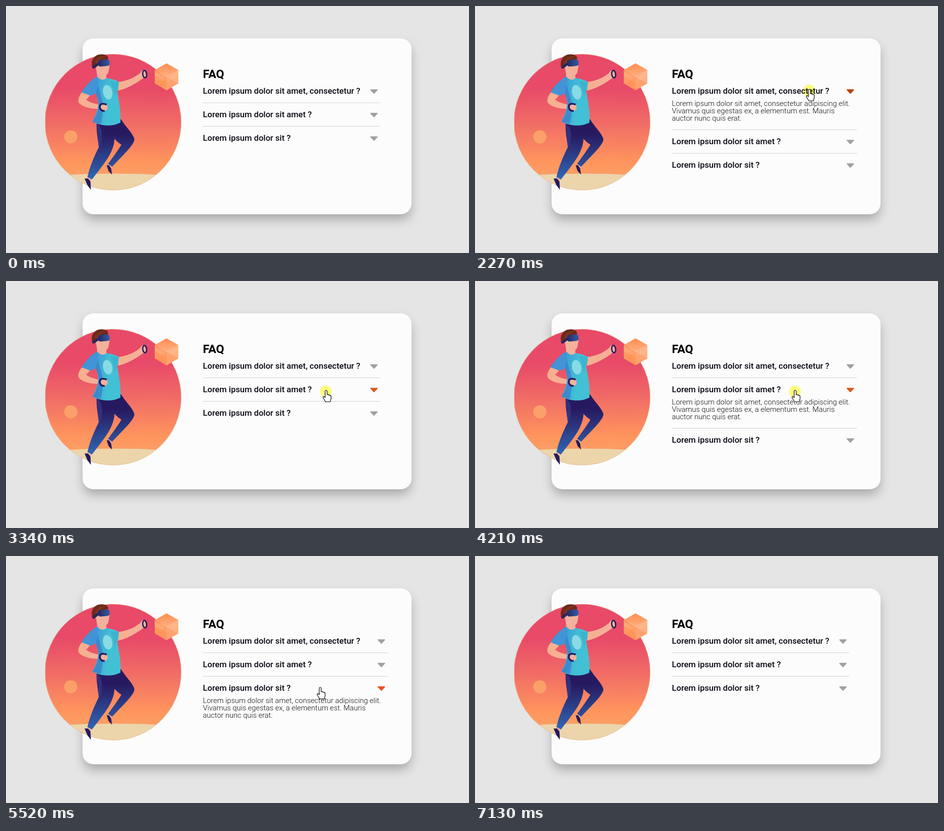
An HTML page for the animation above (7.73 s loop, 943x504 px).

```html
<!DOCTYPE html>
<html lang="en">
<head>
<meta charset="utf-8">
<title>FAQ accordion</title>
<style>
  html, body { margin: 0; width: 100%; height: 100%; overflow: hidden; background: #e5e5e5; }
  .card { position: absolute; left: 156px; top: 66px; width: 670px; height: 359px; border-radius: 22px;
    background: #fcfcfc; box-shadow: 0 12px 22px -2px rgba(0, 0, 0, .28); }
  svg { position: absolute; left: 0; top: 0; width: 943px; height: 504px; }
  text { font-family: Roboto, sans-serif; fill: #000; }
  .title { font-size: 24px; font-weight: 700; }
  .question { font-size: 17px; font-weight: 500; fill: #0b0712; }
  .answer { font-size: 15px; font-weight: 300; fill: #111; }
  .click { fill: #ffff7d; mix-blend-mode: multiply; }
  .pointer { fill: #fff; stroke: #000; stroke-linejoin: round; }
</style>
</head>
<body>
<div class="card"></div>
<svg viewBox="0 0 943 504">
  <defs>
    <linearGradient id="sky" x1="0" y1="0" x2="0" y2="1">
      <stop offset=".25" stop-color="#e84a68"/>
      <stop offset=".5" stop-color="#f06b66"/>
      <stop offset=".79" stop-color="#ff955d"/>
      <stop offset="1" stop-color="#f8a86f"/>
    </linearGradient>
    <linearGradient id="shirt" x1="0" y1="0" x2="1" y2=".15">
      <stop offset=".1" stop-color="#3c86d3"/>
      <stop offset=".45" stop-color="#3ea3d5"/>
      <stop offset=".75" stop-color="#42c0d5"/>
    </linearGradient>
    <linearGradient id="pants" gradientUnits="userSpaceOnUse" x1="0" y1="245" x2="0" y2="350">
      <stop offset=".15" stop-color="#27195f"/>
      <stop offset="1" stop-color="#3163b0"/>
    </linearGradient>
    <linearGradient id="skin" x1="0" y1="0" x2="1" y2="0">
      <stop offset="0" stop-color="#f8b08c"/>
      <stop offset="1" stop-color="#f3b09c"/>
    </linearGradient>
    <linearGradient id="visor" x1="0" y1="0" x2="1" y2="0">
      <stop offset="0" stop-color="#28275f"/>
      <stop offset="1" stop-color="#315ba6"/>
    </linearGradient>
    <linearGradient id="lid" x1="0" y1="0" x2="0" y2="1">
      <stop offset="0" stop-color="#ff8d50"/>
      <stop offset="1" stop-color="#ffb183"/>
    </linearGradient>
    <clipPath id="scene"><path d="M80 90H365V385H80z"/></clipPath>
    <clipPath id="disc"><circle cx="218" cy="237" r="139"/></clipPath>
  </defs>

  <g clip-path="url(#scene)">
    <circle cx="218" cy="237" r="139" fill="url(#sky)"/>
    <path d="M70 350Q130 342 218 342T366 350V385H70z" fill="#ecd5ab" clip-path="url(#disc)"/>
    <circle cx="218" cy="237" r="138.6" fill="none" stroke="#e6bd96" stroke-opacity=".7"/>
    <circle cx="132" cy="267" r="13.5" fill="#faa068"/>
  </g>

  <g id="cube">
    <path d="M327 117L351 130.500L327 145L303 130.500z" fill="url(#lid)"/>
    <path d="M303 130.500L327 145V172L303 158z" fill="#ff9a60"/>
    <path d="M351 130.500L327 145V172L351 158z" fill="#fdb184"/>
    <path d="M303 134L327 148L351 134V143L327 156L303 143z" fill="#ffc198" opacity=".35"/>
    <path d="M327 145L351 158L327 172L303 158z" fill="#ff8c52" opacity=".4"/>
  </g>

  <g id="player">
    <path d="M166 344L176 350L172 358L165 354zM211 316L217 325L215 331L208 326z" fill="#f5b399"/>
    <path d="M160 352L167 352L172 358L173 375L166 366zM205 325L210 325L214 331L216 344L209 337z" fill="#241a60"/>
    <path d="M205 240L234 231C245 248 260 262 261.500 272C261 284 236 306 216 328L208 322C218 308 230 292 235 283C224 276 212 264 205 240z" fill="url(#pants)"/>
    <path d="M185 234C183 255 188 275 189 288C178 310 170 330 166 349L175 354C190 335 207 313 213 300C219 288 221 278 221 268L233 236z" fill="url(#pants)"/>
    <path d="M191 245Q200 262 192 286L189 288Q186 260 185 240z" fill="#35408f" opacity=".6"/>

    <path d="M156 174C148 184 146 192 148 197C155 206 175 211 193 210L195 202C181 200 168 196 163 191C168 187 170 184 172 180z" fill="url(#skin)"/>
    <path d="M227 155C245 154 262 146 273 137C276 131 280 129 283 132L286 143C277 148 268 157 250 165C240 170 232 172 226 173z" fill="url(#skin)"/>
    <path d="M182 120C184 133 187 140 185 150Q196 157 205 149L204 141C210 138 209 129 211 121z" fill="#f3b19b"/>
    <path d="M186 144C174 150 164 160 154 176L173 183L183 178L188 196C188 214 180 226 176 236C193 245 216 247 233 238C235 214 229 190 226 172H228L230 155Q220 149 205 147Q195 155 186 144z" fill="url(#shirt)"/>
    <path d="M186 145C175 151 164 160 154 176L173 183L183 176Q190 159 186 145z" fill="#4393d7"/>
    <path d="M187 161L183 178L189 197Q187 224 176 236L193 241Q202 204 192 180z" fill="#387bc8" opacity=".65"/>
    <path d="M212 153L219 171L222 188L226 172H228L230 156z" fill="#36a9cb" opacity=".55"/>
    <ellipse cx="207" cy="176" rx="9.500" ry="15" transform="rotate(-12 207 176)" fill="#88dbe5"/>

    <ellipse cx="200" cy="207" rx="7" ry="7" fill="#f4b19b"/>
    <path d="M205 201Q190 196 191 207Q193 215 201 214" fill="none" stroke="#241b5c" stroke-width="3.500"/>
    <ellipse cx="282.500" cy="139" rx="4" ry="7.500" transform="rotate(-8 282 139)" fill="none" stroke="#27205f" stroke-width="2.800"/>

    <path d="M176 127C171 109 181 98 196 98.500C206 99 210 104 207 110L190 112C183 115 182 121 179 128z" fill="#6e2a1b"/>
    <path d="M179 117Q188 100 206 102Q195 104 190 112z" fill="#88391f" opacity=".6"/>
    <path d="M175 125L189 113L190 120L179 128z" fill="#28275f"/>
    <rect x="187.500" y="109.500" width="23.500" height="13.500" rx="5" transform="rotate(-5 199 116)" fill="url(#visor)"/>
  </g>

  <text class="title" x="401" y="147">FAQ</text>
  <g id="list"></g>
  <circle class="click" id="click" r="12"/>
  <path class="pointer" id="arrow" d="M.5.5V16l3.600-3.400 2.600 5.900 2.400-1-2.600-5.800H11.500z"/>
  <path class="pointer" id="hand" stroke-width="1.200" d="M-2 2a2 2 0 0 1 4 0V9c1-1 3-.6 3 1c1-1 2.800-.5 2.800 1c1-.8 2.200-.2 2.200 1.300V17c0 2-1.500 3-1.500 6.500H-1.500C-2 20-7 16-6.300 14c.5-1.800 2.500-1.500 4.300 1z"/>
</svg>

<script>
const LOOP = 7730;
const GREY = [161, 161, 161];
const ROW = 48, EXTRA = 55;

const questions = [
  'Lorem ipsum dolor sit amet, consectetur ?',
  'Lorem ipsum dolor sit amet ?',
  'Lorem ipsum dolor sit ?'
];
const answer = [
  'Lorem ipsum dolor sit amet, consectetur adipiscing elit.',
  'Vivamus quis egestas ex, a elementum est. Mauris',
  'auctor nunc quis erat.'
];

// Hover colour of each marker and [time, strength] points
const hot = [[185, 65, 15], [219, 90, 28], [240, 79, 30]];
const glow = [
  [[900, 0], [1200, 1], [2600, 1], [2790, 0]],
  [[2780, 0], [3100, 1], [4750, 1], [4960, 0]],
  [[4820, 0], [5120, 1], [6990, 1], [7125, 0]]
];
// [row, open, close]; the button is held just before each
const opened = [[0, 1530, 2340], [1, 3410, 4270], [2, 5520, 6800]];
const presses = [[1400, 1530], [2270, 2340], [3340, 3410], [4210, 4270], [5450, 5520], [6710, 6800]];

// Fingertip path: [time, x, y]
const xs = [[382, 771], [1200, 681, 'soft'], [2540, 681], [2810, 664, 'out'], [3340, 652, 'out'], [4421, 652], [5180, 640, 'soft']];
const ys = [[382, 243], [1200, 170, 'soft'], [2540, 170], [2810, 217, 'out'], [3340, 223, 'out'], [4421, 223], [5180, 268, 'soft']];
const ease = { soft: u => u * u * (3 - 2 * u), out: u => u * (2 - u) };

const burst = (from, to, n) => Array.from({ length: n }, (_, i) => Math.floor(from + (to - from) * i / (n - 1)) - 4);
const ticks = [0, 70, 210, 7060, 7130, ...presses.flat(),
  ...burst(450, 1200, 12), ...burst(2600, 3340, 12), ...burst(4490, 5180, 11)].sort((a, b) => a - b);

const $ = id => document.getElementById(id);
function add(parent, tag, attrs, text = '') {
  const node = document.createElementNS('http://www.w3.org/2000/svg', tag);
  for (const key in attrs) node.setAttribute(key, attrs[key]);
  node.textContent = text;
  return parent.appendChild(node);
}
function track(keys, t) {
  if (t <= keys[0][0]) return keys[0][1];
  const i = keys.findIndex(k => k[0] >= t);
  if (i < 0) return keys.at(-1)[1];
  const [t0, a] = keys[i - 1], [t1, b, kind] = keys[i];
  const u = (t - t0) / (t1 - t0);
  return a + (b - a) * (kind ? ease[kind](u) : u);
}
const place = (node, x, y) => node.setAttribute('transform', `translate(${x} ${y})`);
const show = (node, on) => node.style.display = on ? '' : 'none';

const rows = questions.map((q, i) => {
  const g = add($('list'), 'g', {});
  add(g, 'text', { class: 'question', x: 401, y: 179 }, q);
  const marker = add(g, 'path', { d: 'M743 171H756L749.5 178z', 'stroke-width': 2, 'stroke-linejoin': 'round' });
  const body = add(g, 'g', {});
  answer.forEach((line, n) => add(body, 'text', { class: 'answer', x: 401, y: 204 + n * 15 }, line));
  const rule = i < 2 && add(g, 'rect', { x: 401, y: 197, height: 1, fill: '#d0d0d0' });
  return { g, marker, body, rule };
});

function draw(now) {
  const t = ticks.findLast(k => k <= now);
  const active = opened.find(([, from, to]) => t >= from && t < to);
  const open = active ? active[0] : -1;

  rows.forEach((row, i) => {
    place(row.g, 0, i * ROW + (open >= 0 && i > open ? EXTRA : 0));
    place(row.marker, open >= 0 ? 15 : 0, 0);
    const k = track(glow[i], t);
    const color = `rgb(${GREY.map((c, n) => Math.round(c + (hot[i][n] - c) * k))})`;
    row.marker.setAttribute('fill', color);
    row.marker.setAttribute('stroke', color);
    show(row.body, i === open);
    if (row.rule) {
      row.rule.setAttribute('width', open >= 0 ? 377 : 361);
      place(row.rule, 0, i === open ? EXTRA : 0);
    }
  });

  const x = track(xs, t), y = track(ys, t);
  const moving = t >= 446 && t < 7060;
  show($('hand'), moving);
  place($('hand'), x, y);
  show($('arrow'), t >= 70 && t < 7130 && !moving);
  place($('arrow'), ...(t < 210 ? [775, 266] : t < 446 ? [771, 243] : [648, 330]));
  show($('click'), presses.some(([from, to]) => t >= from && t < to));
  place($('click'), x - .5, y + 2.5);
}

const start = performance.now();
(function frame() {
  draw((performance.now() - start) % LOOP);
  requestAnimationFrame(frame);
})();
</script>
</body>
</html>
```
